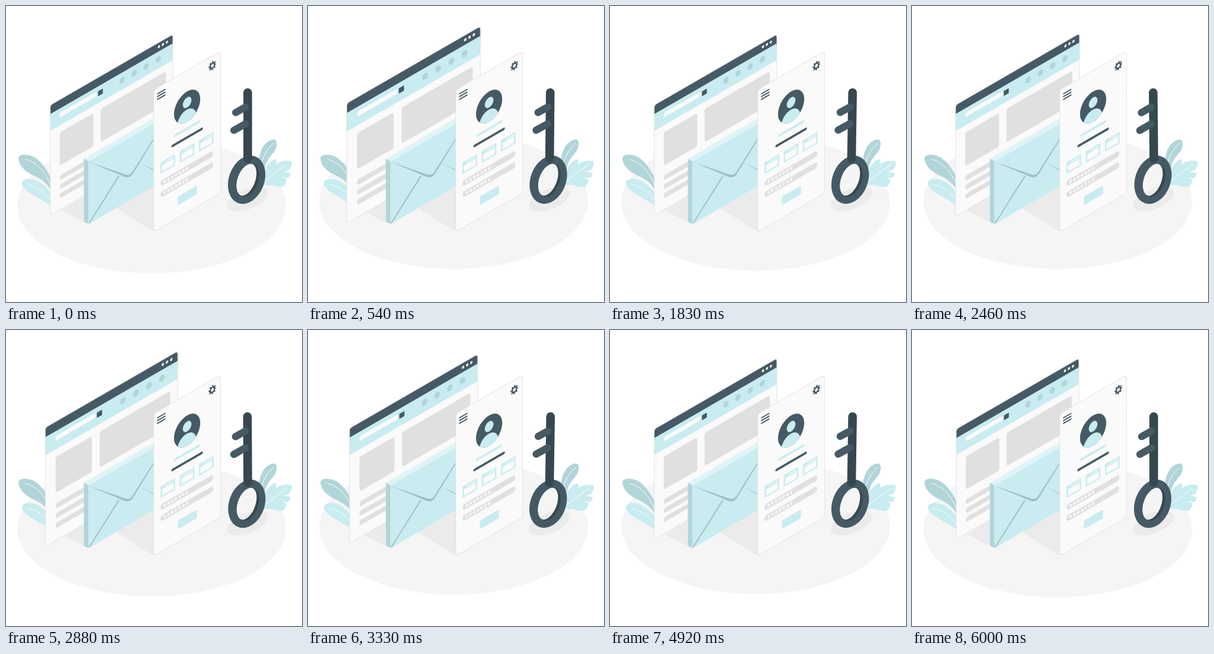
An HTML page for the animation above (6.04 s loop, 500 by 500 pixels).

```html
<!DOCTYPE html>
<html lang="en">
<head>
<meta charset="utf-8">
<title>Account access</title>
<style>
  html, body { margin: 0; width: 100%; height: 100%; overflow: hidden; background: #fff; }
  svg { display: block; width: 100vw; height: 100vh; }
  .dark { fill: #455a64; }
  .side { fill: #37474f; }
  .blue { fill: #c9ecf0; }
  .teal { fill: #b1d5d9; }
  .grey { fill: #e0e0e0; }
  .shade { fill: #ebebeb; }
  .paper { fill: #fafafa; }
  .edge { fill: none; stroke: #e0e0e0; stroke-width: 1; }
  .vein { fill: none; stroke: #fff; stroke-width: 1; stroke-linecap: round; }
  .line { fill: none; stroke: #455a64; stroke-linecap: round; }
</style>
</head>
<body>
<svg viewBox="0 0 500 500">
  <ellipse id="floor" cx="246" cy="337" rx="227" ry="114.5" fill="#f5f5f5"/>

  <!-- plants -->
  <path class="teal" d="M82 322C73 302 62 293 46 286C31 279 21 268 21 257C22 250 35 250 45 254C58 260 70 276 81 302Z"/>
  <path class="vein" d="M33 259C52 264 67 280 76 305"/>
  <path class="blue" d="M82 342C68 331 55 325 41 316C31 310 26 303 27 297C30 291 42 291 52 295C65 301 74 312 82 327Z"/>
  <path class="vein" d="M37 302C53 304 66 315 78 332"/>
  <path class="blue" d="M433 298C434 283 438 271 444 266Q450 258 456 259L457 267Q466 259 482 262Q485 268 478 277L469 280L481 282Q480 289 476 291L466 289L474 293Q473 301 468 305Q455 306 447 302Q438 304 434 301Z"/>
  <path class="vein" d="M436 296Q456 281 474 268"/>
  <path class="teal" d="M426 272C427 254 430 240 440 231Q449 224 455 226Q459 231 456 240C453 250 441 254 437 275Z"/>
  <path class="vein" d="M452 232C443 240 436 250 432 264"/>

  <path class="shade" d="M92 345L131 322V365Z"/>
  <g id="page">
    <g transform="matrix(.866 -.5 0 1 74.8 170)">
      <rect class="paper" y="-2.5" width="239" height="186" rx="4"/>
      <rect class="dark" y="-2.5" width="239.3" height="24" rx="5"/>
      <rect class="blue" y="12.5" width="239" height="28.5"/>
      <rect class="edge" y="-2.5" width="239" height="186" rx="4"/>
      <rect x="18.5" y="20" width="72" height="7.5" rx="3" class="paper"/>
      <rect x="93" y="20.7" width="9.5" height="8.3" rx="1" class="dark"/>
      <g id="tabs" class="teal"></g>
      <g id="lights" class="paper"></g>
      <g class="grey">
        <rect x="18.5" y="53" width="65.5" height="56" rx="4"/>
        <rect x="98" y="53" width="127.5" height="56" rx="4"/>
        <g id="rows"></g>
      </g>
    </g>
  </g>

  <!-- envelope -->
  <path class="shade" d="M185 341L249 304V381Z"/>
  <path fill="#dff4f6" d="M131.5 258L249 190V202L139 264Z"/>
  <path class="teal" d="M131.5 258L140 263V368L134 366Q131.5 365 131.5 362Z"/>
  <path class="blue" d="M139 263L249 199.5V304.5L143 366.5Q139 369 139 365Z"/>
  <path fill="#9fbfc4" d="M139 263L201 284.5Q208 287 213 281L249 224V227L214 284Q208 292 200 288.5ZM139.5 367L190 286.5L191.5 288L141.5 367ZM225 264.5L249 276V277.5Z"/>

  <!-- profile card -->
  <g transform="matrix(.866 -.5 0 1 249.5 141.5)">
    <rect class="paper" width="130.5" height="240" rx="6"/>
    <rect class="edge" width="130.5" height="240" rx="6"/>
    <path class="line" stroke-width="2.2" d="M7.5 10.5H22M7.5 15.2H22M7.5 19.9H22"/>
    <g class="line" transform="translate(114.5 16.6)">
      <circle r="4.2" stroke-width="2.8"/>
      <circle r="6.1" stroke-width="2.8" stroke-dasharray="2.395" stroke-dashoffset="1.2" stroke-linecap="butt"/>
    </g>
    <clipPath id="disc"><circle cx="65.2" cy="61" r="25.7"/></clipPath>
    <circle class="dark" cx="65.2" cy="61" r="25.6"/>
    <g class="blue">
      <circle cx="65.2" cy="54" r="8.5"/>
      <circle cx="64.4" cy="84.5" r="18.6" clip-path="url(#disc)"/>
      <rect x="39.5" y="96" width="51" height="4.4" rx="2.2"/>
    </g>
    <rect class="dark" x="34.5" y="111" width="61.5" height="4.2" rx="2.1"/>
    <g id="boxes"></g>
    <g id="fields"></g>
    <rect class="blue" x="47" y="204" width="37.5" height="14.5" rx="2"/>
  </g>

  <!-- key -->
  <ellipse class="shade" cx="408" cy="326" rx="37" ry="17" transform="rotate(-22 408 326)"/>
  <g id="key">
    <g transform="translate(406.5 293.5) rotate(20)" fill-rule="evenodd">
      <path id="rim" class="side"/>
      <path id="ring" class="dark"/>
    </g>
    <rect class="side" x="401" y="139" width="14.6" height="126" rx="7.3"/>
    <path class="line" stroke-width="12.2" d="M388 180L404.5 170.7M385 210L404.5 199"/>
  </g>
</svg>
<script>
const el = id => document.getElementById(id);
const fill = (id, n, part) => el(id).innerHTML = Array.from({ length: n }, (_, i) => part(i)).join("");
const dot = (x, y, r) => `<circle cx="${x}" cy="${y}" r="${r}"/>`;
const box = (cls, x, y, w, h, r) =>
  `<rect class="${cls}" x="${x}" y="${y}" width="${w}" height="${h}" rx="${r}"/>`;
const oval = (x, rx, ry) =>
  `M${x - rx} 0a${rx} ${ry} 0 1 0 ${2 * rx} 0a${rx} ${ry} 0 1 0 ${-2 * rx} 0z`;

fill("tabs", 4, i => dot(140 + 23.6 * i, 25.6, 5.2));
fill("lights", 3, i => dot(212 + 7.7 * i, 4.8, 2.2));
fill("rows", 3, i => box("grey", 18.5, 125.5 + 15.3 * i, 65, 8.5, 4));
fill("boxes", 3, i => {
  const x = 13.3 + 37.5 * i;
  return box("blue", x, 129.5, 28.5, 19.5, 1) + box("paper", x + 3, 136, 22.5, 10.5, 0) +
    box("paper", x + 9, 132.5, 16.5, 1.3, 0);
});
fill("fields", 2, i => {
  const y = 165.5 + 18.8 * i;
  let s = box("grey", 13.3, y - 5, 103, 10, 5) + '<g class="paper">';
  for (let k = 0; k < 7; k++) s += dot(21.5 + 7.3 * k, y, 2.4);
  return s + "</g>";
});
el("rim").setAttribute("d", oval(1, 20, 31) + oval(-.5, 15, 28.3));
el("ring").setAttribute("d", oval(0, 30, 42) + oval(2, 17.5, 29));

// linear interpolation through [position, value] stops
function track(stops, p) {
  const i = stops.findIndex(s => s[0] > p);
  const [a, va] = stops[i - 1], [b, vb] = stops[i];
  return va + (vb - va) * (p - a) / (b - a);
}
const beat = [[0, 1], [.1, 1.1], [.3, 1], [.4, 1], [.5, 1.1], [.6, 1], [1, 1]];
const sway = [[0, 0], [.25, 1], [.75, -1], [1, 0]];
const lift = [[0, 0], [.5, -10], [1, 0]];

const start = performance.now();
function draw(now) {
  const t = Math.max(0, now - start) % 6040;
  const short = t % 1500 / 1500;
  const s = track(beat, t % 6000 / 6000);
  el("page").setAttribute("transform", `translate(178.3 201) scale(${s}) translate(-178.3 -201)`);
  el("key").setAttribute("transform", `rotate(${track(sway, short)} 406.5 237)`);
  el("floor").setAttribute("transform", `translate(0 ${track(lift, short)})`);
  requestAnimationFrame(draw);
}
draw(start);
</script>
</body>
</html>
```
